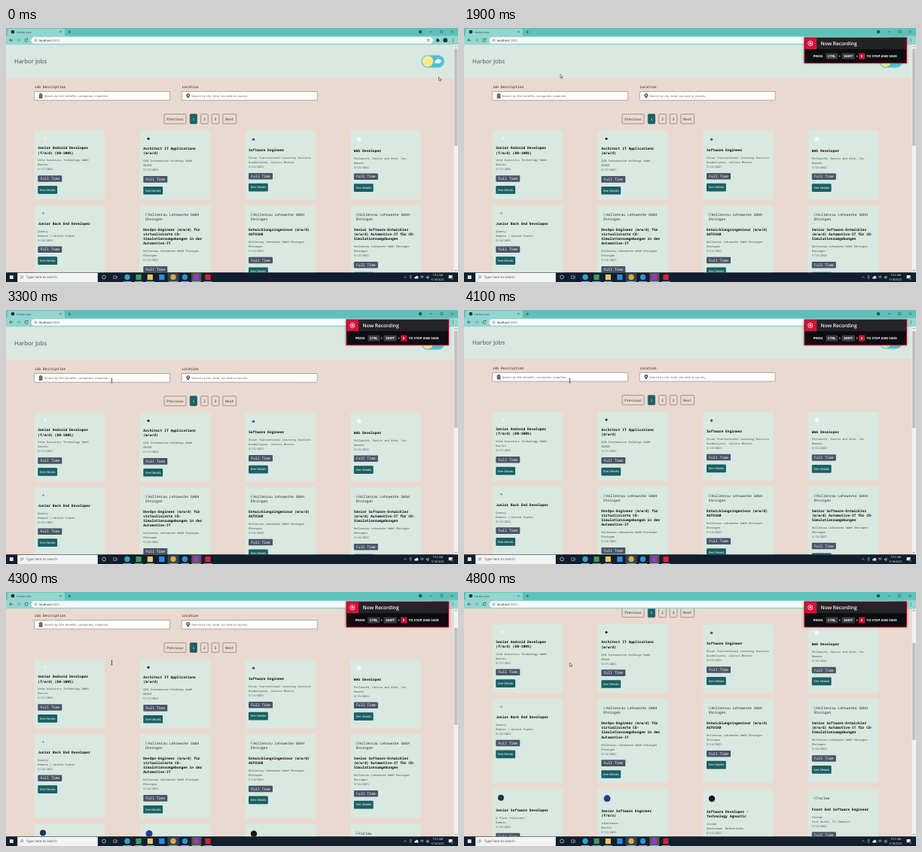
Write an HTML page with a canvas that moves like this. It is 600 px wide and 338 px high and loops after 5000 ms.

```html
<!DOCTYPE html>
<html lang="en">
<head>
<meta charset="utf-8">
<title>Harbor Jobs</title>
<style>
html, body { margin: 0; width: 100%; height: 100%; overflow: hidden; background: #ead9ce; }
canvas { display: block; width: 600px; height: 338px; }
</style>
</head>
<body>
<canvas id="stage"></canvas>
<script>
const W = 600, H = 338, LOOP = 5000, STEP = 100;
const canvas = document.getElementById('stage');
const ctx = canvas.getContext('2d');
const dpr = window.devicePixelRatio || 1;
canvas.width = W * dpr;
canvas.height = H * dpr;

const MONO = '"Noto Sans Mono", "DejaVu Sans Mono", monospace';
const ARIAL = '"Liberation Sans", Arial, sans-serif';
const SANS = '"Open Sans", "Noto Sans", sans-serif';
const TEAL = '#1a6066', SLATE = '#4a5568', INK = '#1c1c1c';

// Text is placed by its left (or middle) and its vertical centre.
function text(str, x, y, size, color, font = MONO, weight = 400, align = 'left') {
  ctx.font = `${weight} ${size}px ${font}`;
  ctx.fillStyle = color;
  ctx.textAlign = align;
  ctx.fillText(str, x, y + size * 0.35);
}

function rect(x, y, w, h, color) {
  ctx.fillStyle = color;
  ctx.fillRect(x, y, w, h);
}

function round(x, y, w, h, r, fill, stroke, lw = 0.6) {
  ctx.beginPath();
  ctx.roundRect(x, y, w, h, r);
  if (fill) { ctx.fillStyle = fill; ctx.fill(); }
  if (stroke) { ctx.strokeStyle = stroke; ctx.lineWidth = lw; ctx.stroke(); }
}

function dot(x, y, r, fill, stroke, lw = 0.6) {
  ctx.beginPath();
  ctx.arc(x, y, r, 0, Math.PI * 2);
  if (fill) { ctx.fillStyle = fill; ctx.fill(); }
  if (stroke) { ctx.strokeStyle = stroke; ctx.lineWidth = lw; ctx.stroke(); }
}

function line(color, lw, ...pts) {
  ctx.beginPath();
  for (let i = 0; i < pts.length; i += 2) ctx.lineTo(pts[i], pts[i + 1]);
  ctx.strokeStyle = color;
  ctx.lineWidth = lw;
  ctx.stroke();
}

// Linear interpolation through [time, ...values] keys.
function track(keys, t) {
  if (t <= keys[0][0]) return keys[0].slice(1);
  for (let i = 1; i < keys.length; i++) {
    const a = keys[i - 1], b = keys[i];
    if (t <= b[0]) {
      const k = (t - a[0]) / (b[0] - a[0]);
      return a.slice(1).map((v, j) => v + (b[j + 1] - v) * k);
    }
  }
  return keys[keys.length - 1].slice(1);
}

const scrollKeys = [[3900, 0], [4000, 0.4], [4100, 1.2], [4200, 3], [4300, 47], [4400, 83], [4500, 93.75]];
const pointerKeys = [
  [1400, 574.5, 65], [1500, 550, 63], [1600, 440, 56], [1700, 290, 52], [1800, 175, 52],
  [1900, 128, 61.5], [2000, 120, 86], [2100, 116, 87], [2200, 121, 88], [2400, 121, 88],
  [2500, 113, 88], [2900, 113, 88], [3000, 118, 89], [3100, 128, 92], [3200, 138, 94],
  [3300, 140.4, 94]
];

const COLS = [37.5, 177.5, 317.2, 457];
const ROWS = [[136.7, 91.5], [236, 111.8], [355.6, 112]];
const SCHOOL = 'Hollenrau Lehrwerke GmbH';
const schoolInfo = [SCHOOL + ' Ehningen', 'Ehningen', '5/14/2021'];

// Each card: top title line, title lines, details, then a mark or alt text.
const cards = [
  { y: 159.7, title: ['Senior Android Developer', '(f/m/d) (80-100%)'],
    info: ['Velm Acoustics Technology GmbH', 'Berlin', '5/17/2021'], mark: ['#f6faf8', 52, 147, 1.3] },
  { y: 160.6, title: ['Architect IT Applications', '(m/w/d)'],
    info: ['QVN Intermarine Holdings GmbH', '80368', '5/17/2021'], mark: ['#2a2a2a', 189, 147.3, 1.6] },
  { y: 162.6, title: ['Software Engineer'],
    info: ['Olvan Transnational Learning Services', 'Guadalajara, Jalisco Mexico', '5/15/2021'], mark: ['#41618f', 328.5, 148.3, 1.8] },
  { y: 163.1, title: ['Web Developer'],
    info: ['Pellworth, Dorvin and Ashe, Inc.', 'Remote', '5/15/2021'], mark: ['#f7f9f8', 468.5, 148, 3] },
  { y: 260.2, title: ['Junior Back End Developer'],
    info: ['Quorvy', 'Remote | United States', '5/14/2021'], mark: ['#8b98a8', 49.5, 246.5, 1.3] },
  { y: 268.2, title: ['DevOps-Engineer (m/w/d) für', 'virtualisierte CO-', 'Simulationsumgebungen in der', 'Automotive-IT'],
    info: schoolInfo, alt: [SCHOOL, 'Ehningen'] },
  { y: 268.2, title: ['Entwicklungsingenieur (m/w/d)', 'AUTOSAR'],
    info: schoolInfo, alt: [SCHOOL, 'Ehningen'] },
  { y: 268.2, title: ['Senior Software-Entwickler', '(m/w/d) Automotive-IT für CO-', 'Simulationsumgebungen'],
    info: schoolInfo, alt: [SCHOOL, 'Ehningen'] },
  { y: 384.3, title: ['Senior Software Developer'],
    info: ['Q Plant Solutions', 'Remote', '5/14/2021'], mark: ['#25304f', 49, 367.6, 4] },
  { y: 385.3, title: ['Senior Software Engineer', '(f/m/x)'],
    info: ['talentmoor', 'Berlin', '5/12/2021'], mark: ['#30348c', 190, 368.6, 4.5] },
  { y: 385.8, title: ['Software Developer -', 'Technology Agnostic'],
    info: ['Zunvek', 'Amsterdam, Netherlands', '5/12/2021'], mark: ['#161616', 329, 368.8, 4.2] },
  { y: 382.8, title: ['Front End Software Engineer'],
    info: ['Farlow', 'Fort Worth, TX (Remote)', '5/12/2021'], alt: ['Farlow'] }
];

function brokenImage(x, y) {
  rect(x, y - 2, 3, 4, '#fff');
  rect(x + 0.4, y - 1, 2.2, 1.2, '#9cc4ea');
  rect(x + 0.4, y + 0.5, 1.8, 1, '#5aa54e');
  line('#8d979c', 0.4, x, y - 2, x + 3, y - 2, x + 3, y + 2, x, y + 2, x, y - 2);
}

function drawCard(card, i) {
  const x = COLS[i % 4], [top, h] = ROWS[i >> 2], left = x + 4.8;
  round(x, top, 93.8, h, 1.5, '#d9e8e0');
  if (card.mark) {
    const [color, mx, my, r] = card.mark;
    dot(mx, my, r, color);
  } else {
    const ay = top + 12.4;
    brokenImage(x + 7.5, ay - 0.6);
    text(card.alt[0], x + 11.2, ay, 4.7, '#2b3030');
    if (card.alt[1]) text(card.alt[1], x + 7.5, ay + 6.1, 4.7, '#2b3030');
  }
  let y = card.y;
  for (const s of card.title) { text(s, left, y, 4.65, '#0c0c0c', MONO, 700); y += 6.2; }
  y += 4;
  for (const s of card.info) { text(s, left, y, 3.74, '#4b4f4e'); y += 6; }
  y += 6.4;
  round(left, y - 4.3, 32, 8.6, 1, SLATE);
  text('Full Time', left + 16, y, 4.75, '#fff', MONO, 400, 'center');
  y += 14.8;
  round(left, y - 5.3, 25.8, 10.7, 1.2, TEAL);
  text('See Details', left + 12.9, y, 4.05, '#fff', ARIAL, 400, 'center');
}

function field(x, label, hint) {
  text(label, x + 0.2, 78.7, 4.6, INK);
  round(x, 84.5, 180, 11.6, 0.6, '#fff', '#7c7c7c');
  text(hint, x + 12.8, 90.3, 4.17, '#757575', ARIAL);
}

function toggle() {
  round(551.5, 36.3, 30.2, 16.4, 8.2, '#53bfd2', '#7fd3e0', 1);
  dot(559.8, 44.4, 7.3, '#fae98c');
  dot(571.3, 45, 1.9, '#fff');
  dot(573.7, 43.6, 2.3, '#fff');
  dot(576, 43.6, 1.6, '#fff');
  round(569.5, 44.2, 7.4, 2.8, 1.4, '#fff');
}

function drawPage(scroll) {
  ctx.save();
  ctx.beginPath();
  ctx.rect(0, 22, W, 303.5);
  ctx.clip();
  rect(0, 22, W, 304, '#ead9ce');
  ctx.translate(0, -scroll);
  rect(0, 22, W, 44.3, '#dae8e1');
  text('Harbor Jobs', 11, 44.2, 7.8, '#46465a', SANS);
  toggle();

  field(37.6, 'Job Description', 'Search by title, benefits, companies, expertise');
  round(43.7, 87.8, 4.8, 6, 0.6, '#666');
  rect(45, 86.9, 2.2, 1.3, '#666');
  line('#aaa', 0.4, 44.5, 90, 47.7, 90);
  field(233.2, 'Location', 'Search by city, state, zip code or country');
  ctx.beginPath();
  ctx.arc(241.8, 89.5, 2.4, Math.PI * 0.9, Math.PI * 2.1);
  ctx.lineTo(241.8, 94);
  ctx.fillStyle = '#555';
  ctx.fill();
  dot(241.8, 89.5, 0.9, '#fff');

  for (const [s, x, w] of [['Previous', 210, 29], ['1', 244.2, 9.4], ['2', 258.6, 9.6], ['3', 273.2, 9.6], ['Next', 287.8, 17.8]]) {
    const on = s === '1';
    round(x, 114.6, w, 12.8, 1.3, on ? TEAL : null, on ? TEAL : '#6a6a70');
    text(s, x + w / 2, 121.1, 4.7, on ? '#fff' : '#30343c', MONO, 400, 'center');
  }
  cards.forEach(drawCard);
  ctx.restore();

  rect(594.6, 22, 5.4, 303.5, '#f1f1f1');
  round(595.1, 27.5 + scroll * 0.43, 4.4, 129, 0, '#c1c1c1');
  line('#505050', 0.7, 596, 25.3, 597.3, 24, 598.6, 25.3);
  line('#505050', 0.7, 596, 322, 597.3, 323.3, 598.6, 322);
}

function drawBrowser() {
  const ink = '#263d3c', bar = '#93d5cf';
  rect(0, 0, W, 11, '#5ec0ba');
  round(2, 0.8, 76, 11, [2.5, 2.5, 0, 0], bar);
  rect(0, 10.6, W, 11.7, bar);
  dot(9, 5.2, 2.4, '#23343a');
  text('Harbor Jobs', 14, 5.3, 3.5, ink, SANS);
  line(ink, 0.5, 71.2, 3.9, 73.6, 6.3);
  line(ink, 0.5, 73.6, 3.9, 71.2, 6.3);
  line(ink, 0.6, 82.2, 5.3, 86.2, 5.3);
  line(ink, 0.6, 84.2, 3.3, 84.2, 7.3);
  dot(550, 5.2, 2.1, ink);
  line(bar, 0.5, 549, 4.8, 550, 5.8, 551, 4.8);
  line(ink, 0.6, 562.5, 5, 566, 5);
  round(576.8, 3.5, 3, 3, 0, null, ink, 0.5);
  line(ink, 0.5, 590.8, 3.5, 593.8, 6.5);
  line(ink, 0.5, 593.8, 3.5, 590.8, 6.5);

  line(ink, 0.7, 7, 14, 4.8, 16.2, 7, 18.4);
  line(ink, 0.7, 4.8, 16.2, 9.2, 16.2);
  line('#64918d', 0.7, 16.8, 14, 19, 16.2, 16.8, 18.4);
  line('#64918d', 0.7, 14.6, 16.2, 19, 16.2);
  ctx.beginPath();
  ctx.arc(27, 16.2, 2, 0.2, 5.4);
  ctx.strokeStyle = ink;
  ctx.lineWidth = 0.7;
  ctx.stroke();
  rect(28, 14, 1.2, 1.2, ink);
  round(33.5, 12, 533, 8.7, 4.3, '#f5fbfa');
  dot(39.5, 16.3, 1.6, null, '#5f6368', 0.5);
  line('#5f6368', 0.5, 39.5, 15.9, 39.5, 17.2);
  text('localhost', 43.8, 16.3, 4, '#202124', SANS);
  const end = 43.8 + ctx.measureText('localhost').width;
  text(':3000', end, 16.3, 4, '#6b7075', SANS);

  ctx.beginPath();
  for (let i = 0; i < 10; i++) {
    const a = -Math.PI / 2 + i * Math.PI / 5, r = i % 2 ? 0.9 : 2.1;
    ctx.lineTo(560.7 + r * Math.cos(a), 16.4 + r * Math.sin(a));
  }
  ctx.closePath();
  ctx.strokeStyle = '#5f6368';
  ctx.lineWidth = 0.45;
  ctx.stroke();
  round(571.2, 14.8, 3.4, 3.6, 0.4, ink);
  dot(572.8, 14.6, 0.9, ink);
  dot(574.7, 16.5, 0.9, ink);
  dot(583.2, 16.2, 2.9, '#2a3140');
  for (const y of [14.4, 16.2, 18]) dot(593.3, y, 0.5, ink);
}

function drawTaskbar() {
  const pale = '#dfe6eb';
  rect(0, 325.4, W, 12.6, '#101e2d');
  rect(4.9, 329.2, 4.8, 4.8, pale);
  rect(15.2, 325.8, 106.6, 12.2, '#f2f3f4');
  dot(21.3, 331.2, 1.5, null, '#3a3a3a', 0.5);
  line('#3a3a3a', 0.5, 20.2, 332.4, 18.9, 333.8);
  text('Type here to search', 26.8, 331.7, 4.5, '#4b4b4b', SANS);
  dot(130, 331.6, 2.4, null, pale, 0.7);
  round(142.6, 329.8, 3.4, 3.6, 0, null, pale, 0.5);
  line(pale, 0.5, 147.2, 329.5, 147.2, 333.7);

  rect(214.6, 325.4, 15, 12.6, '#34424f');
  rect(246.2, 325.4, 13, 12.6, '#5b5540');
  const apps = [[161, '#2aa5c9', 1], [176, '#37a05b', 0], [191.3, '#f2c75c', 0], [206.8, '#2a8fdc', 0],
    [222, '#d9ab3b', 1], [237.5, '#2b93d6', 1], [252.6, '#8a3be0', 0], [268, '#e01f35', 0]];
  for (const [x, color, disc] of apps) {
    if (disc) dot(x, 331.5, 3.7, color);
    else round(x - 3.6, 328, 7.2, 7.2, 0.6, color);
    if (x !== 206.8) rect(x - 5.5, 337.1, 11, 0.9, '#7fb6dd');
  }

  line(pale, 0.6, 528, 332.6, 529.9, 330.7, 531.8, 332.6);
  round(536.2, 329.3, 1.8, 3.4, 0.9, null, pale, 0.5);
  line(pale, 0.5, 537.1, 333, 537.1, 334.3);
  dot(543.6, 332.3, 1.3, pale);
  dot(545.4, 331.5, 1.7, pale);
  round(542.6, 331.9, 5, 1.7, 0.8, pale);
  for (const r of [1.2, 2.4, 3.6]) {
    ctx.beginPath();
    ctx.arc(552.3, 333.7, r, -2.35, -0.8);
    ctx.strokeStyle = pale;
    ctx.lineWidth = 0.5;
    ctx.stroke();
  }
  rect(557.9, 331, 1.1, 1.6, pale);
  line(pale, 0.6, 559, 331, 560.3, 329.8, 560.3, 333.8, 559, 332.6);
  line(pale, 0.4, 561.4, 330.6, 561.8, 331.8, 561.4, 333);
  text('7:52 AM', 573.2, 328.8, 3.7, '#fff', SANS, 400, 'center');
  text('5/18/2021', 573.2, 335, 3.7, '#fff', SANS, 400, 'center');
  round(587.6, 329, 5, 4.2, 0.3, pale);
  dot(592.3, 333.8, 1.7, '#31566e');
}

function drawToast(alpha) {
  const red = '#d3123a', y = 37.5;
  const label = (s, x, align = 'left') => text(s, x, y, 4.3, '#fff', SANS, 700, align);
  ctx.save();
  ctx.globalAlpha = alpha;
  ctx.shadowColor = 'rgba(0,0,0,.35)';
  ctx.shadowBlur = 3 * dpr;
  rect(451.4, 12.4, 136.6, 34.8, red);
  ctx.shadowBlur = 0;
  ctx.shadowColor = 'transparent';
  rect(452.3, 13.3, 134.8, 33, '#0d0d10');
  rect(452.3, 13.3, 134.8, 14.9, '#242428');
  rect(452.3, 13.3, 15.8, 14.9, red);
  dot(459.8, 20.6, 3.1, null, '#fff', 0.8);
  dot(459.8, 20.6, 1.4, '#fff');
  text('Now Recording', 473.6, 20.6, 6.6, '#fff', SANS, 600);
  label('PRESS', 463.6);
  for (const [s, x, w, fill] of [['CTRL', 480.3, 15.8, '#3b3b40'], ['SHIFT', 501.4, 17.4, '#3b3b40'], ['E', 524, 8, red]]) {
    round(x, 33.4, w, 8.2, 0.8, fill);
    label(s, x + w / 2, 'center');
  }
  label('+', 498.7, 'center');
  label('+', 521.4, 'center');
  label('TO STOP AND SAVE', 534.6);
  ctx.restore();
}

function drawPointer(t) {
  let [x, y] = track(pointerKeys, t);
  if (t >= 2000 && t < 4800) {
    line('#1a1a1a', 0.7, x, y - 2.7, x, y + 2.7);
    line('#1a1a1a', 0.5, x - 1.2, y - 2.8, x + 1.2, y - 2.8);
    line('#1a1a1a', 0.5, x - 1.2, y + 2.8, x + 1.2, y + 2.8);
    return;
  }
  ctx.save();
  ctx.translate(x, y);
  ctx.beginPath();
  for (const [px, py] of [[0, 0], [0, 4.9], [1.1, 3.9], [1.9, 5.6], [2.6, 5.3], [1.9, 3.6], [3.4, 3.5]]) ctx.lineTo(px, py);
  ctx.closePath();
  ctx.fillStyle = '#fff';
  ctx.fill();
  ctx.strokeStyle = '#111';
  ctx.lineWidth = 0.5;
  ctx.stroke();
  ctx.restore();
}

function draw(t) {
  ctx.setTransform(dpr, 0, 0, dpr, 0, 0);
  ctx.textBaseline = 'alphabetic';
  ctx.textRendering = 'geometricPrecision';
  drawPage(track(scrollKeys, t)[0]);
  drawBrowser();
  drawTaskbar();
  if (t >= 100) drawToast(t < 200 ? 0.6 : 1);
  drawPointer(t);
}

const start = performance.now();
function tick() {
  const t = (performance.now() - start) % LOOP;
  draw(Math.floor(t / STEP) * STEP);
  requestAnimationFrame(tick);
}
tick();
</script>
</body>
</html>
```
